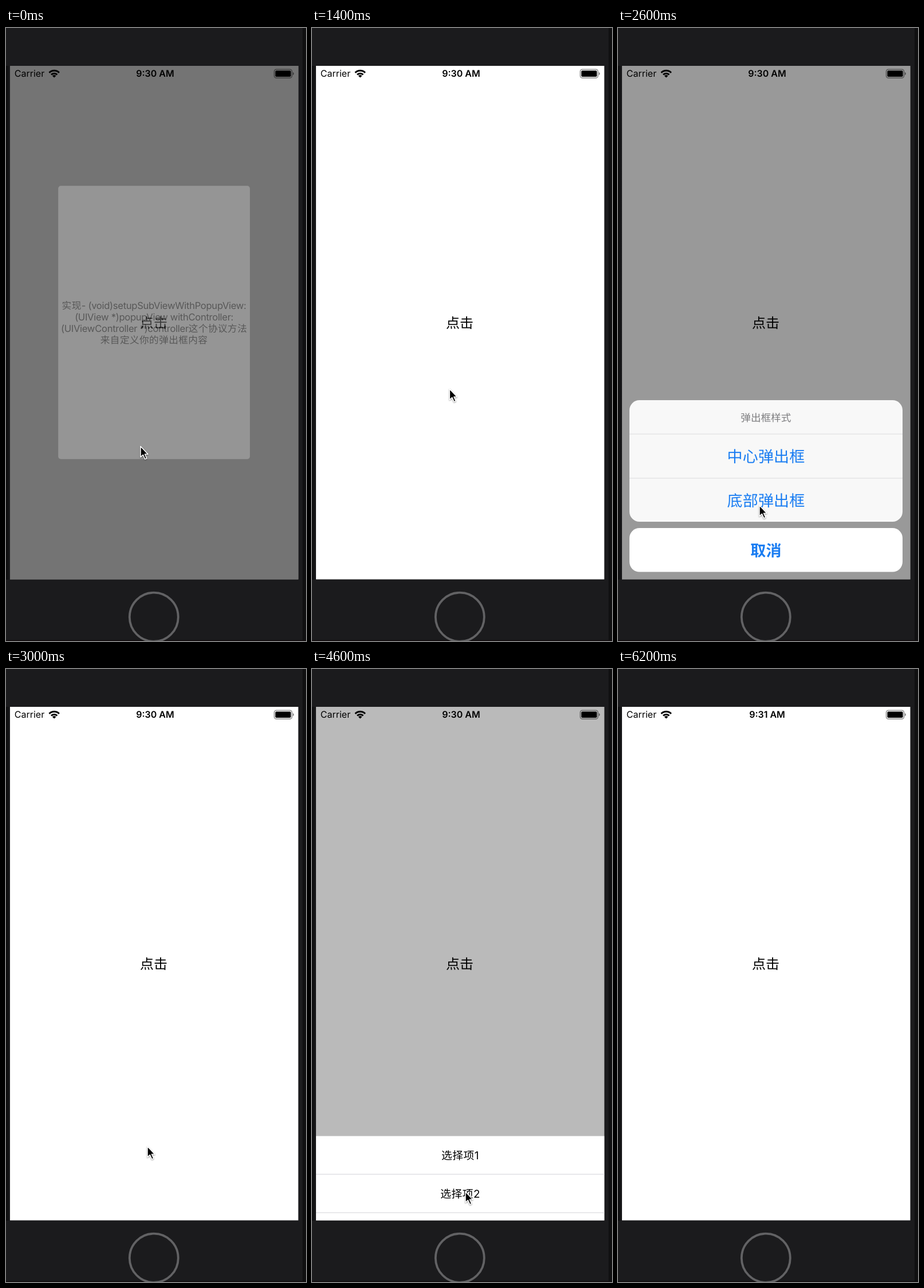
An HTML page for the animation above (7400 ms loop, 524 by 1069 pixels).

```html
<!DOCTYPE html>
<html lang="zh">
<head>
<meta charset="utf-8">
<title>Popup demo</title>
<style>
html, body { margin: 0; width: 100%; height: 100%; overflow: hidden; background: #1b1b1d; }
svg { display: block; width: 524px; height: 1069px; }
text {
  font-family: Inter, "Noto Sans CJK SC", "Noto Sans CJK", sans-serif;
  text-anchor: middle;
  text-rendering: geometricPrecision;
}
.body { font-size: 18.8px; letter-spacing: -.38px; }
.han { letter-spacing: .45px; }
.action { font-size: 27px; letter-spacing: .2px; fill: #1a7df2; }
.bar { font-size: 16px; }
</style>
</head>
<body>
<svg viewBox="0 0 524 1069">
  <defs>
    <clipPath id="screen"><rect x="7" y="66" width="503.5" height="895.5"/></clipPath>
    <linearGradient id="edge">
      <stop stop-color="#0b0b0c"/>
      <stop offset="1" stop-color="#1b1b1d"/>
    </linearGradient>
  </defs>

  <rect width="524" height="1069" fill="#1b1b1d"/>
  <rect y="66" width="7" height="896" fill="url(#edge)"/>
  <rect x="518" width="6" height="1069" fill="#101011"/>
  <rect y="1067.5" width="524" height="1.5" fill="#120d0f"/>
  <circle cx="258.3" cy="1027.2" r="42.5" fill="none" stroke="#626264" stroke-width="3.8"/>

  <g clip-path="url(#screen)">
    <rect x="6" y="65" width="506" height="898" fill="#fff"/>
    <text x="258" y="523" font-size="24">点击</text>
    <rect id="dim" x="6" y="65" width="506" height="898"/>

    <g id="sheet">
      <rect x="20" width="477" height="212" rx="17.5" fill="#f8f8f8"/>
      <path d="M20 59.2H497M20 136.2H497" stroke="#e2e2e4" stroke-width="1.2"/>
      <text x="258.3" y="36.6" font-size="17.6" fill="#7e7e80">弹出框样式</text>
      <text class="action" x="258.5" y="108">中心弹出框</text>
      <text class="action" x="258.5" y="185.2">底部弹出框</text>
      <rect x="20" y="223" width="477" height="76.6" rx="17.5" fill="#fff"/>
      <text class="action" x="258.5" y="271.5" font-weight="600">取消</text>
    </g>

    <g id="menu">
      <rect x="6" y="666" width="506" height="297" fill="#fff"/>
      <path d="M6 732.7H511M6 799.7H511M6 961.2H511" stroke="#dcdcdf" stroke-width="1.3"/>
      <rect x="6" y="866.5" width="506" height="28" fill="#c8c6c9"/>
      <g class="body han">
        <text x="259" y="706.7">选择项1</text>
        <text x="259" y="773.7">选择项2</text>
        <text x="259" y="840.7">选择项3</text>
        <text x="258.5" y="935.2">取消</text>
      </g>
    </g>

    <g id="card">
      <rect x="-188.7" y="-268.5" width="377.4" height="537" rx="5" fill="#fff"/>
      <g class="body">
        <text y="-26.3"><tspan class="han">实现</tspan>- (void)setupSubViewWithPopupView:</text>
        <text y="-3.9">(UIView *)popupView withController:</text>
        <text y="18.4">(UIViewController *)controller<tspan class="han">这个协议方法</tspan></text>
        <text class="han" y="40.8">来自定义你的弹出框内容</text>
      </g>
    </g>
  </g>

  <g class="bar">
    <text x="41" y="85.4">Carrier</text>
    <text id="clock" x="260.5" y="85.4" font-weight="600"></text>
  </g>
  <g transform="translate(84.2 86.6)">
    <path d="M0 0L-3.2 -3.2A4.5 4.5 0 0 1 3.2 -3.2Z"/>
    <path d="M-5.2 -5.2A7.4 7.4 0 0 1 5.2 -5.2M-8.7 -8.7A12.3 12.3 0 0 1 8.7 -8.7" fill="none" stroke="#000" stroke-width="2.9"/>
  </g>
  <rect x="468.5" y="72.2" width="31" height="14.8" rx="3.6" fill="none" stroke="#000" stroke-opacity=".5" stroke-width="1.3"/>
  <path d="M501 76.8Q505 79.6 501 82.4Z" opacity=".5"/>
  <rect x="470.4" y="74.2" width="27.2" height="10.8" rx="1.8"/>

  <path id="cursor" d="M0 .5V19.3L4.4 15.4L7.8 22.9L10.8 21.5L7.5 14.3H13Z" stroke="#fff" stroke-width="1.5"
    stroke-linejoin="round" style="filter:drop-shadow(0 1px 1px #0006)"/>
</svg>
<script>
const LOOP = 7400, STEP = 200;
const el = id => document.getElementById(id);
const place = (id, transform) => el(id).setAttribute('transform', transform);

// Progress from 0 to 1 between two times; a higher power eases out harder.
const ramp = (t, from, to, power = 1) =>
  1 - (1 - Math.min(1, Math.max(0, (t - from) / (to - from)))) ** power;

// Stops of the pointer: time, x, y
const stops = [[0, 235, 729], [500, 209, 843], [1000, 209, 843], [1600, 256, 522], [1800, 259, 530],
  [2000, 270, 667], [2400, 247, 832], [3000, 247, 832], [3800, 196, 847], [4600, 268, 911],
  [5000, 268, 911], [5400, 296, 623]];

function pointer(t) {
  let [, x, y] = stops[0];
  for (let i = 1; i < stops.length; i++) {
    const p = ramp(t, stops[i - 1][0], stops[i][0]);
    x += (stops[i][1] - x) * p;
    y += (stops[i][2] - y) * p;
  }
  return `${x} ${y}`;
}

function draw(t) {
  const spring = 1 - .113 * Math.exp(-t / 100) * Math.cos(Math.PI * t / 200);
  const cardOut = ramp(t, 1000, 1400), sheetOut = ramp(t, 2600, 3000), menuOut = ramp(t, 4400, 4800);
  const sheetUp = ramp(t, 1800, 2200, 1.62) - sheetOut;
  const menuUp = ramp(t, 3000, 3600, 2) - menuOut;

  place('card', `translate(258.6 513.5) scale(${spring})`);
  el('card').setAttribute('opacity', Math.min(1, .24 + t / 200) * (1 - cardOut));
  place('sheet', `translate(0 ${962 - 313 * sheetUp})`);
  place('menu', `translate(0 ${297 * (1 - menuUp)})`);
  el('dim').setAttribute('opacity', Math.max(
    .545 * (1 - cardOut),
    .4 * (ramp(t, 1800, 2200, 2) - sheetOut),
    t > 3000 ? .545 * (1 - menuOut) : 0));

  place('cursor', `translate(${pointer(t)})`);
  el('cursor').style.display = t < 5600 ? '' : 'none';
  el('clock').textContent = t < 6200 ? '9:30 AM' : '9:31 AM';
}

const start = performance.now();
function tick() {
  const t = (performance.now() - start) % LOOP;
  draw(Math.floor(t / STEP) * STEP);
  requestAnimationFrame(tick);
}
tick();
</script>
</body>
</html>
```
